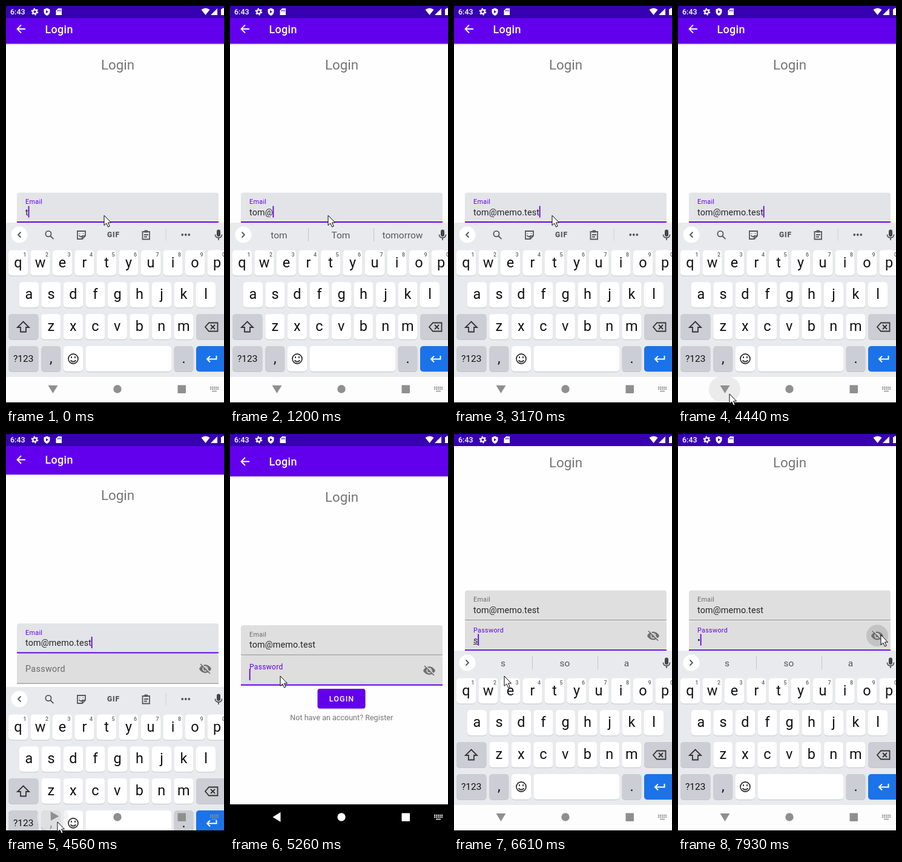
An HTML page that plays this animation: 360x661 px, repeating every 8000 ms.

```html
<!DOCTYPE html>
<html lang="en">
<head>
<meta charset="utf-8">
<title>Login form</title>
<style>
html, body { margin: 0; width: 100%; height: 100%; overflow: hidden; background: #fff; }
svg { display: block; width: 360px; height: 661px; font-family: Roboto, sans-serif; }
.mid { text-anchor: middle; }
.medium { font-weight: 500; }
.line { fill: none; stroke: #55585c; stroke-width: 1.8; }
.value { font-size: 14.4px; letter-spacing: .1px; fill: #252525; white-space: pre; }
.label { letter-spacing: .3px; }
.key { font-size: 23.5px; fill: #111; }
.hint { font-size: 9px; fill: #5f6368; font-weight: 500; }
.word { font-size: 15.5px; fill: #55585c; }
</style>
</head>
<body>
<svg viewBox="0 0 360 661">
  <rect width="360" height="661" fill="#fefefe"/>

  <g id="page">
    <rect y="70" width="360" height="1.5" fill="#e4e4e4"/>
    <rect width="360" height="70" fill="#6200ee"/>
    <path d="M32 45.5H19M25 39l-6.5 6.5 6.5 6.5" fill="none" stroke="#fff" stroke-width="1.8"/>
    <text x="64.5" y="52" class="medium" font-size="18" letter-spacing=".3" fill="#fff">Login</text>
    <text x="184.5" y="112.3" class="mid" font-size="22.4" fill="#757575">Login</text>

    <path id="emailBox" d="M18 365.5V320q0-4 4-4H347q4 0 4 4V365.5z"/>
    <text id="emailLabel" x="32" y="334.7" class="label" font-size="10.8">Email</text>
    <text id="email" x="32" y="353" class="value"></text>
    <rect id="emailLine" x="18" width="333"/>

    <path d="M18 415.5V370q0-4 4-4H347q4 0 4 4V415.5z" fill="#dedede"/>
    <circle id="eyeRipple" cx="329" cy="390.7" r="18" fill="#c3c3c3"/>
    <g transform="translate(329 391)">
      <path d="M-10 0C-6-9 6-9 10 0C6 9-6 9-10 0z" fill="#6f6f6f"/>
      <circle r="3.7" fill="none" stroke="#dedede" stroke-width="1.7"/>
      <path d="M-6.7-8.6L9.3 7.4" stroke="#dedede" stroke-width="1.8"/>
      <path d="M-8-8L8 8" stroke="#6f6f6f" stroke-width="1.7"/>
    </g>
    <text id="passLabel" x="32" class="label">Password</text>
    <text id="pass" x="32" y="403" class="value"></text>
    <rect id="underline" x="32" y="404.5" width="8" height="1" fill="#333"/>
    <rect id="passLine" x="18" width="333"/>
    <rect id="caret" width="1.8" height="19" fill="#6200ee"/>

    <rect x="145" y="423" width="78.500" height="32" rx="4" fill="#ccc"/>
    <rect x="144.500" y="421" width="79" height="32.500" rx="4" fill="#6200ee"/>
    <text x="184.500" y="442" class="mid medium" font-size="12.570" letter-spacing="1.100" fill="#fff">LOGIN</text>
    <text x="184.300" y="473" class="mid" font-size="12.570" fill="#757575">Not have an account? Register</text>
  </g>

  <rect width="360" height="20" fill="#3700b3"/>
  <g fill="#fff">
    <text x="7" y="14" class="medium" font-size="12.5">6:43</text>
    <circle cx="47.500" cy="9.500" r="3.200" fill="none" stroke="#fff" stroke-width="2.200"/>
    <circle cx="47.500" cy="9.500" r="5" fill="none" stroke="#fff" stroke-width="1.800" stroke-dasharray="2.600"/>
    <path d="M67.500 3.500l5 2v4q0 4-5 6.500q-5-2.500-5-6.500v-4z"/>
    <path d="M66 7v5l4-2.500z" fill="#3700b3"/>
    <path d="M86 4h6v11h-9.500V7.500z"/>
    <path d="M85.500 6.500v2.500M87.700 6v3M90 6v3" stroke="#3700b3"/>
    <path d="M322.500 6q7-5 14 0l-7 9z"/>
    <path d="M349 4v11h-11z"/>
    <path d="M355 5h2V3.500h3V15h-5z"/>
  </g>

  <rect y="612" width="360" height="49"/>
  <g id="keyboard">
    <rect y="358" width="360" height="303" fill="#e8eaed"/>
    <rect y="613" width="360" height="48" fill="#fdfdfd"/>
    <circle cx="22" cy="378" r="13.500" fill="#fff"/>
    <path id="chevron" class="line" d="M2.500-4.500L-2 0L2.500 4.500"/>
    <g id="tools">
      <g class="line">
        <circle cx="70" cy="376.500" r="4.600"/>
        <path d="M73.300 380l5.200 5.200"/>
        <path d="M118 372h13v8l-5 5h-8zM131 380h-5v5M120.500 379q2 3 5 2M121.500 375.500v1M127.500 375.500v1"/>
        <path d="M225.500 373h11.500v12.500h-11.500zM228 378h7M228 381.500h5"/>
        <path d="M228.500 372.500h5.500" stroke-width="4"/>
        <path d="M264 368v20" stroke="#ccced1" stroke-width="1"/>
      </g>
      <text x="177.500" y="382.300" class="mid" font-size="12" font-weight="900" letter-spacing=".8" fill="#55585c">GIF</text>
      <g fill="#55585c"><circle cx="291.300" cy="378" r="1.900"/><circle cx="296.800" cy="378" r="1.900"/><circle cx="302.300" cy="378" r="1.900"/></g>
    </g>
    <g id="words">
      <path d="M129.500 367v22M237.500 367v22" stroke="#c4c6ca"/>
      <text x="81" y="384" class="mid word"></text>
      <text x="183" y="384" class="mid word"></text>
      <text x="285" y="384" class="mid word"></text>
    </g>
    <rect x="348" y="369.500" width="6" height="11.500" rx="3" fill="#444"/>
    <path class="line" stroke-width="1.500" d="M345.500 377.500q0 5.500 5.500 5.500t5.500-5.500M351 383v4"/>
    <g id="keys"></g>
    <g class="line" style="stroke:#333">
      <path d="M28.500 521.500l9.500 9.500h-5v7.500h-9v-7.500h-5z"/>
      <path d="M335 523.500h14.500v14h-14.500l-6-7zM338 527l7 7M345 527l-7 7"/>
      <circle cx="111" cy="583" r="8"/>
      <path d="M106.500 585.500q4.500 4.500 9 0M108 579v3M114 579v3"/>
      <path d="M347.500 578v5.500h-15M337 578.500l-5 5 5 5" style="stroke:#fff;stroke-width:2"/>
    </g>
  </g>

  <rect id="navRipple" x="51" y="612" width="52" height="43" rx="21.500" fill="#ebebeb"/>
  <g id="nav">
    <path id="back" d="M-7 0L6-8V8z"/>
    <circle cx="184" cy="633" r="6.700"/>
    <rect x="283.500" y="626.500" width="13.500" height="13.500" rx="1"/>
    <path d="M337 630h14M337 633h14" stroke-width="2" stroke-dasharray="2 1"/>
    <path d="M340 636.500h8" stroke-width="1.500"/>
  </g>
  <rect y="655" width="360" height="6"/>
  <path id="mouse" d="M0 0V16.500l3.800-3.500 2.700 6 2.700-1.100-2.700-5.900H11.500z" fill="#fff" stroke="#000"/>
</svg>

<script>
const LOOP = 8000, ADDRESS = 'tom@memo.test', PITCH = 36.5;
const el = id => document.getElementById(id);
const set = (id, attrs) => { for (const k in attrs) el(id).setAttribute(k, attrs[k]); };
const show = (id, on) => set(id, { visibility: on ? 'visible' : 'hidden' });

function key(x, y, label = '', { w = 32, fill = '#fff', size = 23.5, hint = '' } = {}) {
  const rect = (dy, color) => `<rect x="${x}" y="${y + dy}" width="${w}" height="42" rx="5" fill="${color}"/>`;
  const dy = size > 20 ? 28 : 26;
  return rect(1, '#c3c6ca') + rect(0, fill) +
    `<text class="mid key" x="${x + w / 2}" y="${y + dy}" style="font-size:${size}px">${label}</text>` +
    `<text class="mid hint" x="${x + 27}" y="${y + 10.5}">${hint}</text>`;
}

const grey = { fill: '#cbced4' }, wide = { w: 49.5, fill: '#cbced4' };
const row = (letters, x, y, hints = '') =>
  [...letters].map((c, i) => key(x + i * PITCH, y, c, { hint: hints[i] })).join('');
el('keys').innerHTML =
  row('qwertyuiop', 4, 403.5, '1234567890') + row('asdfghjkl', 22, 456.3) + row('zxcvbnm', 58.3, 509) +
  key(4, 509, '', wide) + key(314, 509, '', wide) +
  key(4, 562, '?123', { ...wide, size: 15.5 }) + key(58.3, 562, ',', grey) + key(95, 562) +
  key(131.5, 562, '', { w: 141.5 }) + key(277.5, 562, '.', grey) +
  key(314, 562, '', { w: 49.5, fill: '#1a73e8' });

// Each step changes some values and holds them until the next.
const steps = [
  [0, { typed: 1, pass: '', words: '', mouse: [162, 346], caret: true, kb: 0, pan: 7.5, turn: 90,
        onPass: false, float: 0, navRipple: 0, eyeRipple: false, underline: false }],
  [250, { words: 't to a' }],
  [380, { typed: 2 }],
  [500, { words: 'to too tom' }],
  [630, { typed: 3 }],
  [760, { words: 'tom Tom tomorrow' }],
  [1200, { typed: 4 }],
  [1570, { words: '' }],
  [1970, { typed: 5 }],
  [2220, { typed: 6 }],
  [2480, { typed: 8 }],
  [2630, { typed: 9 }],
  [2930, { typed: 10 }],
  [3050, { typed: 12 }],
  [3170, { typed: 13 }],
  [3750, { caret: false, mouse: [158, 370] }],
  [3880, { mouse: [140, 450] }],
  [4010, { mouse: [112, 555] }],
  [4140, { mouse: [91, 625] }],
  [4290, { mouse: [85, 641], caret: true, navRipple: .5 }],
  [4440, { navRipple: 1 }],
  [4560, { kb: 60, pan: 3, turn: 60, navRipple: .6 }],
  [4710, { kb: 240, pan: 0, turn: 20, navRipple: 0 }],
  [4840, { kb: 303, turn: 0, mouse: [85, 590] }],
  [4980, { mouse: [84, 470] }],
  [5110, { mouse: [83, 400] }],
  [5260, { onPass: true, float: .65 }],
  [5410, { float: 1, kb: 80, pan: 45, turn: 10 }],
  [5530, { kb: 5, pan: 57.3, turn: 42 }],
  [5680, { kb: 0, pan: 57.5, turn: 90 }],
  [6180, { caret: false }],
  [6330, { pass: 's', caret: true }],
  [6610, { words: 's so a', underline: true }],
  [6970, { caret: false }],
  [7510, { caret: true, mouse: [336, 334] }],
  [7780, { pass: '•', underline: false, eyeRipple: true }],
  [7930, { mouse: [335, 332] }]
];

function fieldLine(id, bottom, focused) {
  const height = focused ? 2 : 1;
  set(id, { y: bottom - height, height, fill: focused ? '#6200ee' : '#858585' });
}

function draw(s) {
  set('page', { transform: `translate(0 ${-s.pan})` });
  set('keyboard', { transform: `translate(0 ${s.kb})` });
  set('mouse', { transform: `translate(${s.mouse})` });

  el('email').textContent = ADDRESS.slice(0, s.typed);
  el('pass').textContent = s.pass;
  set('emailBox', { fill: s.onPass ? '#dfdfdf' : '#e3e4e7' });
  set('emailLabel', { fill: s.onPass ? '#6b6b6b' : '#6200ee' });
  set('passLabel', {
    y: 396 - 11 * s.float, 'font-size': 14.4 - 3.6 * s.float, fill: s.onPass ? '#6200ee' : '#6b6b6b'
  });
  fieldLine('emailLine', 365.5, !s.onPass);
  fieldLine('passLine', 415.7, s.onPass);
  const text = el(s.onPass ? 'pass' : 'email');
  const width = text.textContent ? text.getComputedTextLength() : 0;
  set('caret', { x: 31.8 + width, y: s.onPass ? 388 : 338 });
  show('caret', s.caret);
  show('underline', s.underline);
  show('eyeRipple', s.eyeRipple);

  const words = s.words.split(' ');
  show('tools', !s.words);
  show('words', s.words);
  el('words').querySelectorAll('text').forEach((t, i) => t.textContent = words[i] || '');
  set('chevron', { transform: `translate(22 378) scale(${s.words ? -1 : 1} 1)` });

  const navColor = s.kb < 150 ? '#8f8f8f' : '#fff';
  set('nav', { fill: navColor, stroke: navColor, 'stroke-width': 0 });
  set('back', { transform: `translate(77.5 633) rotate(${-s.turn})` });
  set('navRipple', { opacity: s.navRipple });
}

function tick() {
  const now = performance.now() % LOOP;
  draw(Object.assign({}, ...steps.filter(([at]) => at <= now).map(([, change]) => change)));
  requestAnimationFrame(tick);
}
tick();
</script>
</body>
</html>
```
